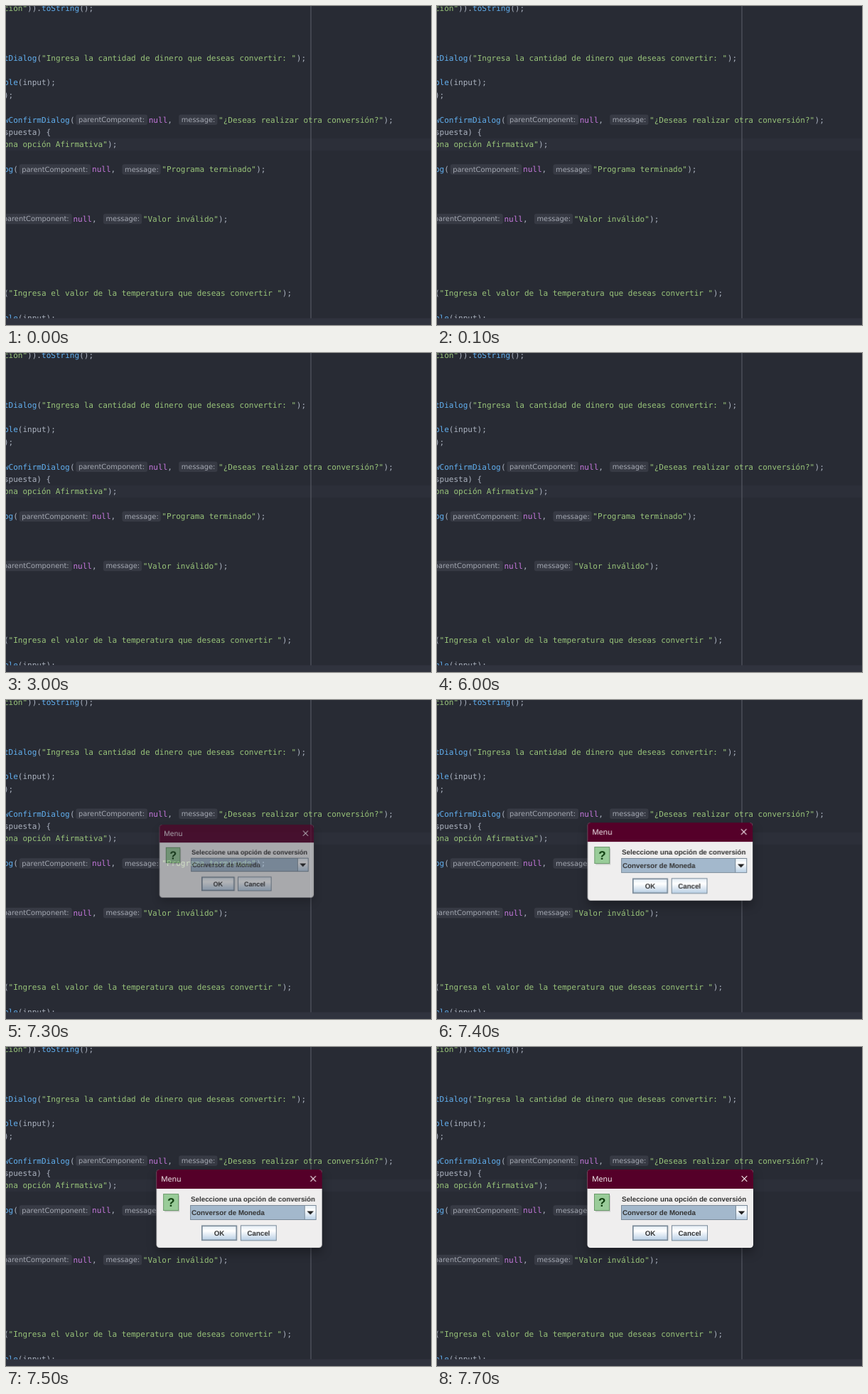
Animation, 598 px wide and 448 px high, one loop 8 s. Source, as an HTML page:

```html
<!DOCTYPE html>
<html lang="es">
<head>
<meta charset="utf-8">
<title>Menu</title>
<style>
html, body { margin: 0; width: 100%; height: 100%; overflow: hidden; background: #282b34; }
svg { display: block; width: 598px; height: 448px; }
text { white-space: pre; text-rendering: geometricPrecision; }
#code { font: 11.034px "DejaVu Sans Mono", monospace; }
.p { fill: #abb2bf; }
.f { fill: #61afef; }
.s { fill: #98c379; }
.n { fill: #c678dd; }
.hint { font: 9.9px "DejaVu Sans", sans-serif; fill: #a4a8b2; }
#dialog { transform-origin: 275px 217px; }
#panel { filter: drop-shadow(0 7px 7px rgba(0, 0, 0, .3)); }
.ui { font: bold 9.8px "Liberation Sans", Arial, sans-serif; fill: #333; }
.title { font: 10.6px "Open Sans", sans-serif; fill: #fff; }
.mid { text-anchor: middle; }
</style>
</head>
<body>
<svg viewBox="0 0 598 448">
  <defs>
    <linearGradient id="metal" x2="0" y2="1">
      <stop offset="0" stop-color="#e4edf5"/>
      <stop offset=".35" stop-color="#fff"/>
      <stop offset="1" stop-color="#b8cfe5"/>
    </linearGradient>
    <clipPath id="frame"><rect x="211.5" y="172" width="233.5" height="110" rx="4.5"/></clipPath>
  </defs>
  <rect width="598" height="448" fill="#282b34"/>
  <rect y="186" width="598" height="17" fill="#2c2f39"/>
  <rect x="428.5" width="1" height="439" fill="#5c606a"/>
  <g id="code"></g>
  <rect y="438.5" width="598" height="9.5" fill="#30333e"/>
  <g id="dialog">
    <g id="panel">
      <g clip-path="url(#frame)">
        <rect x="211" y="172" width="235" height="111" fill="#efeeee"/>
        <rect x="211" y="172" width="235" height="27" fill="#550029"/>
      </g>
    </g>
    <text class="title" x="218" y="189">Menu</text>
    <path d="M428.7 181.2l7.6 7.6m0-7.6l-7.6 7.6" stroke="#f4e8ee" stroke-width="1.1"/>
    <rect x="223" y="208.5" width="21" height="23" fill="#c9cbc9"/>
    <rect x="221.5" y="206.5" width="21" height="23" fill="#9c9" stroke="#6a9a6a"/>
    <text class="ui mid" x="232.3" y="224" style="font-size:17px;fill:#0b3a0b">?</text>
    <text class="ui" x="260" y="217">Seleccione una opción de conversión</text>
    <rect x="259.5" y="222.5" width="177" height="20" fill="#a3b8cc" stroke="#7a8a99"/>
    <rect x="420.5" y="222.5" width="16" height="20" fill="url(#metal)" stroke="#7a8a99"/>
    <path d="M423.7 230.5h9.6l-4.8 5z" fill="#222"/>
    <text class="ui" x="261" y="236.3">Conversor de Moneda</text>
    <rect x="275.8" y="251.3" width="48.6" height="20" fill="url(#metal)" stroke="#7a8a99" stroke-width="1.7"/>
    <rect x="330.5" y="250.8" width="50" height="21" fill="url(#metal)" stroke="#7a8a99"/>
    <text class="ui mid" x="300" y="265.3">OK</text>
    <text class="ui mid" x="355.5" y="265.3">Cancel</text>
  </g>
</svg>
<script>
const NS = 'http://www.w3.org/2000/svg';
const code = document.getElementById('code');
const CELL = 6.643;

const column = n => -3.1 + CELL * n;
const baseline = row => 7 + 17.4 * row;

function add(tag, attrs, text = '') {
  const el = document.createElementNS(NS, tag);
  for (const key in attrs) el.setAttribute(key, attrs[key]);
  el.textContent = text;
  code.append(el);
}

// parts alternate: colour class, text
function write(row, x, ...parts) {
  for (let i = 0; i < parts.length; i += 2) {
    add('text', { class: parts[i], x, y: baseline(row) }, parts[i + 1]);
    x += parts[i + 1].length * CELL;
  }
}

const line = (row, ...parts) => write(row, column(0), ...parts);

function hint(row, x, width, text) {
  const y = baseline(row);
  add('rect', { x, y: y - 11, width, height: 14.5, rx: 3, fill: '#373a44' });
  add('text', { class: 'hint', x: x + 3.6, y: y - 0.7 }, text);
}

// arguments of a dialog call: null parent, then the message
function args(row, col, message) {
  const x = column(col);
  hint(row, x + 1.8, 100.7, 'parentComponent:');
  write(row, x + 104.2, 'n', 'null', 'p', ',');
  hint(row, x + 146.6, 54.3, 'message:');
  write(row, x + 202.5, 's', `"${message}"`, 'p', ');');
}

line(0, 's', 'ción"', 'p', ')).', 'f', 'toString', 'p', '();');
line(4, 'f', 'tDialog', 'p', '(',
  's', '"Ingresa la cantidad de dinero que deseas convertir: "', 'p', ');');
line(6, 'f', 'ble', 'p', '(input);');
line(7, 'p', ');');
line(9, 'f', 'wConfirmDialog', 'p', '(');
args(9, 15, '¿Deseas realizar otra conversión?');
line(10, 'p', 'spuesta) {');
line(11, 's', 'ona opción Afirmativa"', 'p', ');');
line(13, 'f', 'og', 'p', '(');
args(13, 3, 'Programa terminado');
args(17, -1, 'Valor inválido');
line(23, 'p', '(',
  's', '"Ingresa el valor de la temperatura que deseas convertir "', 'p', ');');
line(25, 'f', 'ble', 'p', '(input);');

// time in ms, opacity, scale
const LOOP = 8000;
const steps = [
  [0, 0, 0.93],
  [7300, 0.65, 0.93],
  [7400, 1, 0.995],
  [7500, 1, 0.998],
  [7600, 1, 0.999],
  [7700, 1, 1],
  [LOOP, 1, 1]
];
document.getElementById('dialog').animate(
  steps.map(([time, opacity, scale]) => ({
    offset: time / LOOP, opacity, transform: `scale(${scale})`, easing: 'step-end'
  })),
  { duration: LOOP, iterations: Infinity }
);
</script>
</body>
</html>
```
